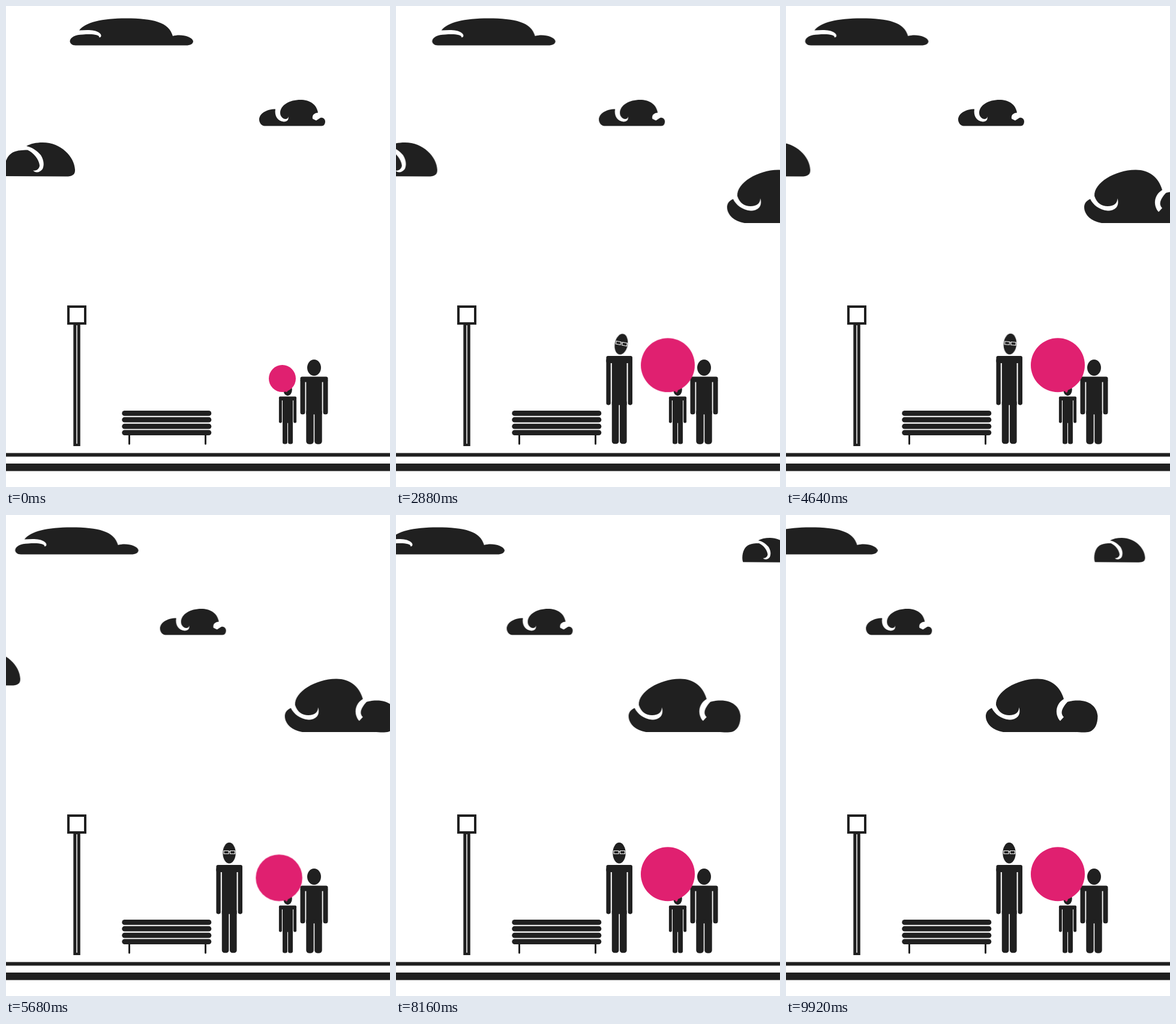
An HTML page that plays this animation: 640x800 px, repeating every 10000 ms.

```html
<!DOCTYPE html>
<html lang="en">
<head>
<meta charset="utf-8">
<title>Balloon in the park</title>
<style>
  html, body { margin: 0; width: 100%; height: 100%; overflow: hidden; background: #fff; }
  svg { display: block; width: 640px; height: 800px; fill: #202020; }

  .drift { animation: drift 10s linear infinite; }
  .man { animation: walk 10s ease-in-out infinite; }
  .head { transform-origin: 372px 580px; animation: nod 10s ease-in-out infinite; }
  .balloon { fill: #e02070; transform-origin: 468px 642px; animation: breathe 10s ease-in-out infinite; }
  .glasses { fill: none; stroke: #fff; stroke-width: 1.1; }

  @keyframes drift { to { transform: translateX(var(--dx)); } }
  @keyframes walk {
    0% { transform: translateX(-126px); opacity: 0; }
    18%, 100% { transform: none; opacity: 1; }
  }
  @keyframes nod {
    0%, 18% { transform: rotate(0deg); }
    28%, 30% { transform: rotate(11deg); }
    60%, 100% { transform: rotate(0deg); }
  }
  @keyframes breathe {
    0% { transform: scale(.5); }
    30%, 42%, 48%, 60%, 66%, 78%, 84%, 96%, 100% { transform: scale(1); }
    36%, 54%, 72%, 90% { transform: scale(.75); }
  }
</style>
</head>
<body>
<svg viewBox="0 0 640 800">
  <defs>
    <path id="dome" d="M34 233C41 229 50 227 61 227C92 227 114 251 115 272C115.500 280 111 283.500 100 283.500L-1 283C-4 276-3 262 2 253C8 243 16 239.500 36 239.500C46 244 55 255 56 265C56 270 51 275 45 273.500C49 278.500 57 277 61 271C64 264 63 256 58 248C52 241 44 235 34 233Z"/>
  </defs>

  <!-- clouds -->
  <path class="drift" style="--dx:-160.7px" d="M122 40.500C132 27 160 20.500 200 20.500C245 20.500 272 27 278 50C290 46 310 50 312 58.500C312 63 307 65.500 300 65.500H116C110 65.500 106.500 62 106.500 58.500C107 52 116 47.500 128 47.500C142 46.500 156 47 155.500 52.500C160 52 159 47 156 45C148 39 136 40 122 40.500Z"/>
  <path class="drift" style="--dx:-291px" d="M449 171.500C434 171.500 422 179 422 189C422 194 426 199.500 431 199.500H526C530 199.500 532 196 532 192C532 188 528 185 524 186L517 190.500L511 187.500C510 181 514 178 520 177.500C518 163 505 156 491 156C472 156 457 165 457 178C457 185 464 190 469 187C470 186 470.500 185 470.500 183.500C471.500 189 469 192.500 463 192.500C453 191.500 447 183 449 171.500Z"/>
  <use class="drift" style="--dx:-160.7px" href="#dome"/>
  <g transform="translate(308.300)">
    <path class="drift" style="--dx:-310.8px" d="M343 321C336 324 332.500 329 333 336C334 348 345 358 362 361H482C492 361.500 500 362 506 360.500C515 357 519.500 348 519.500 334C518 318 505 308 485 308.500C478 308.500 472 310 469 311C461 320 456 329 463 336L457 342.500C449 334 447 316 463 306C457 284 440 272 418 272.500C384 273 349 294 350 316C354 328 362 333 372 333C383 333 388 328 388.500 320C392 333 385 340.500 372 340.500C358 339 348 331 343 321Z"/>
  </g>
  <g transform="translate(873.400 -125.400)">
    <g class="drift" style="--dx:-360.6px"><use href="#dome" transform="scale(.72)"/></g>
  </g>

  <!-- street -->
  <path d="M0 743.500H640V749.500H0ZM0 761H640V773.500H0Z"/>
  <rect x="104" y="500" width="28" height="28" fill="none" stroke="#202020" stroke-width="4"/>
  <path fill-rule="evenodd" d="M112.300 529H123.800V732H112.300ZM117.300 531V728H118.800V531Z"/>
  <g id="bench">
    <path d="M204 712H207V728.500Q205.500 731 204 728.500ZM331 712H334V728.500Q332.500 731 331 728.500Z"/>
  </g>

  <!-- people -->
  <g class="man">
    <g id="man"></g>
    <g class="head">
      <ellipse cx="372" cy="562.200" rx="10.700" ry="17.400"/>
      <path class="glasses" d="M363 558.500H371V563.500H363ZM373.500 558.500H381.500V563.500H373.500ZM371 560H373.500"/>
    </g>
  </g>
  <g id="parent"><ellipse cx="513.500" cy="601.500" rx="11.500" ry="13.500"/></g>
  <g id="child"><ellipse cx="469.500" cy="638" rx="7.300" ry="10.200"/></g>
  <g class="balloon">
    <circle cx="453" cy="597.200" r="45"/>
    <path d="M464 638.500L470 638Q469.500 642.500 467.500 643Q465.500 642.500 464 638.500Z"/>
  </g>
</svg>
<script>
  const draw = (id, html) => document.getElementById(id).insertAdjacentHTML('beforeend', html);
  const bar = (x, y, w, bottom, r = 0) =>
    `<rect x="${x}" y="${y}" width="${w}" height="${bottom - y}" rx="${r}"/>`;

  // half: half width at the shoulders, waist: half width of the torso
  function body(id, { cx, top, half, arm, waist, pit, hand, foot, slit }) {
    const leg = waist - slit / 2;
    draw(id,
      bar(cx - half, top, half * 2, pit, arm * .4) +
      bar(cx - half, top + 4, arm, hand, arm * .45) +
      bar(cx + half - arm, top + 4, arm, hand, arm * .45) +
      bar(cx - waist, top + 4, waist * 2, hand) +
      bar(cx - waist, hand - 9, leg, foot, leg * .38) +
      bar(cx + slit / 2, hand - 9, leg, foot, leg * .38));
  }

  body('man', { cx: 372.2, top: 582, half: 21.8, arm: 7.4, waist: 12.4, pit: 594, hand: 663.7, foot: 728.3, slit: 1.6 });
  body('parent', { cx: 513.5, top: 616.4, half: 23, arm: 8, waist: 13.2, pit: 625.5, hand: 679.3, foot: 728.7, slit: 1.5 });
  body('child', { cx: 469.5, top: 649.5, half: 14.6, arm: 5, waist: 8.5, pit: 656, hand: 693.6, foot: 728.5, slit: 1.1 });

  for (const y of [673, 683.8, 694.8, 705.2]) draw('bench', bar(193.3, y, 149, y + 8.8, 4.4));
</script>
</body>
</html>
```
